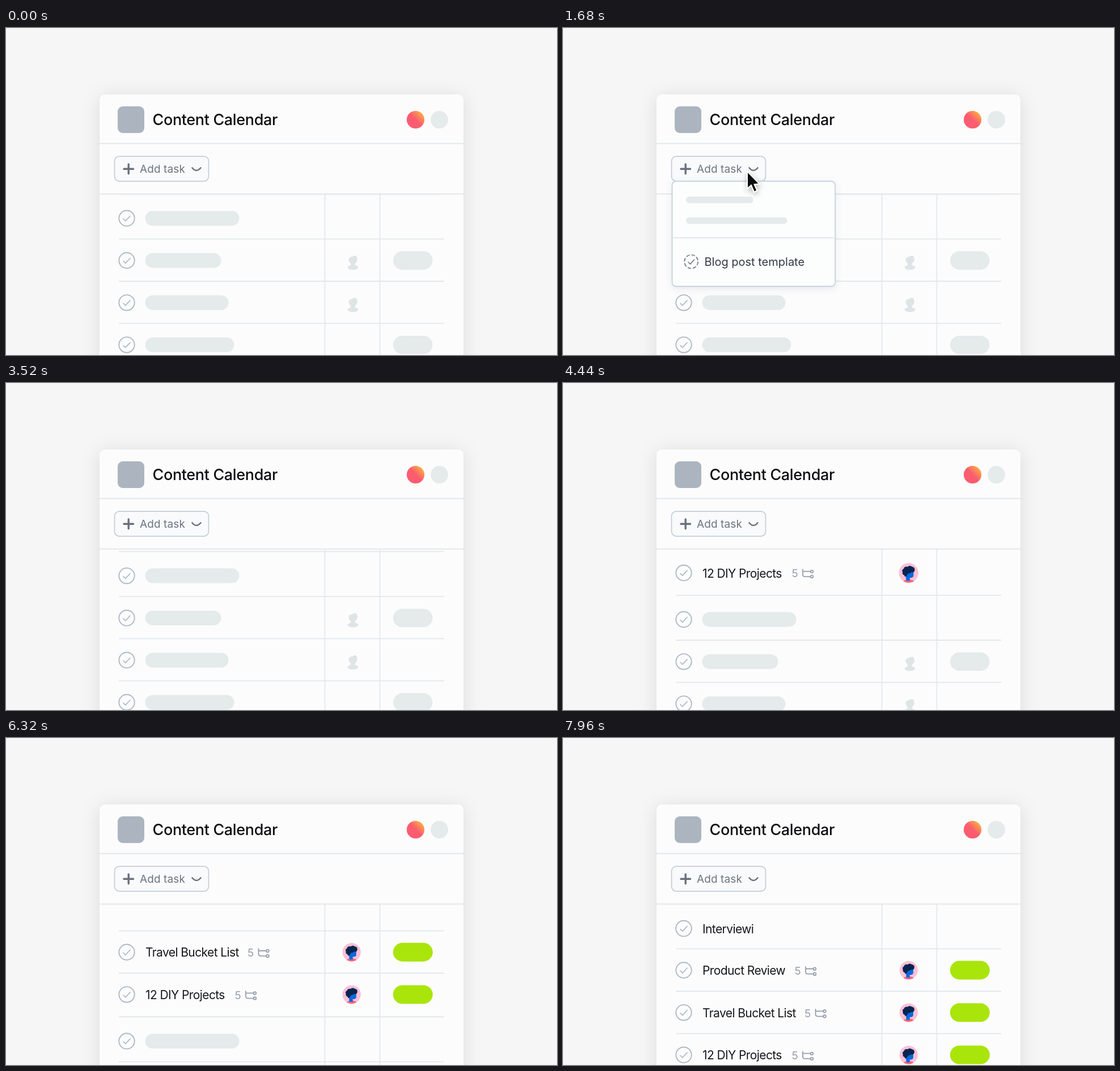
Recreate the animation shown at these times as an HTML page. Size 972 by 576 pixels, loop 8000 ms.

```html
<!DOCTYPE html>
<html lang="en">
<head>
<meta charset="utf-8">
<title>Content Calendar</title>
<style>
  html, body { margin: 0; width: 100%; height: 100%; overflow: hidden; background: #f6f6f6; }
  svg { display: block; width: 100%; height: 100%; }
  text { font-family: Inter, Roboto, "Liberation Sans", sans-serif; white-space: pre; }
  .line { stroke: #e4e8ea; stroke-width: 1.8; fill: none; }
  .soft { fill: #e5eaeb; }
  .check { stroke: #adb9c5; stroke-width: 1.9; fill: none; stroke-linecap: round; stroke-linejoin: round; }
  .title { font-size: 21px; letter-spacing: -.6px; fill: #15171a; }
  .count { font-size: 19px; fill: #959eab; }
  .branch { stroke: #959eab; stroke-width: 1.8; fill: none; stroke-linecap: round; }
</style>
</head>
<body>
<svg id="stage" viewBox="0 0 972 576">
  <defs>
    <filter id="cardShadow" x="-20%" y="-20%" width="140%" height="140%">
      <feDropShadow dx="0" dy="4" stdDeviation="16" flood-color="#000" flood-opacity=".11"/>
    </filter>
    <filter id="menuShadow" x="-20%" y="-20%" width="140%" height="150%">
      <feDropShadow dx="0" dy="4" stdDeviation="6" flood-color="#5a6a78" flood-opacity=".12"/>
    </filter>
    <filter id="cursorShadow" x="-150%" y="-100%" width="400%" height="300%">
      <feDropShadow dx="1" dy="4" stdDeviation="5" flood-color="#000" flood-opacity=".28"/>
    </filter>
    <linearGradient id="warm" x1=".3" y1=".75" x2=".95" y2=".1">
      <stop offset=".35" stop-color="#fb5c6f"/>
      <stop offset="1" stop-color="#fdba3c"/>
    </linearGradient>
    <clipPath id="listClip"><rect x="165" y="292" width="642" height="284"/></clipPath>
    <clipPath id="faceClip"><circle r="16.3"/></clipPath>
    <g id="check">
      <circle r="13.7" class="check"/>
      <path d="M-6 1.2L-2.2 4.8L6-4" class="check" style="stroke-width:1.7"/>
    </g>
    <g id="ghost" fill="#dfe5e7">
      <path d="M-7-2C-9-7-5-10-1-10C2-13 8-12 7-8C9-5 7 0 4 2L3 7H-4V2Q-6 1-7-2Z"/>
      <ellipse cy="9" rx="9.5" ry="4.2"/>
    </g>
    <g id="face" clip-path="url(#faceClip)">
      <circle r="16.3" fill="#fac1d7"/>
      <ellipse cy="16" rx="10.5" ry="5" fill="#ff6577"/>
      <path d="M-5 1L7-5Q9 1 8 6Q6 9 2 8V13H-4Z" fill="#0768de"/>
      <path d="M-7 4Q-11 3-10-1Q-12-5-8-7Q-7-11-2-10Q2-13 6-10Q11-9 10-4Q9 0 5-1L1 1Q-1 0-2 3L-4 6Q-7 7-7 4Z" fill="#08254f"/>
    </g>
    <g id="branch" class="branch">
      <path d="M0-7V2Q0 5.700 4 5.700H13.500M0-3.500H13.500"/>
      <circle cx="16" cy="-3.300" r="2.300"/>
      <circle cx="16" cy="5.700" r="2.300"/>
    </g>
  </defs>

  <rect width="972" height="576" fill="#f6f6f6"/>
  <rect x="165" y="117" width="642" height="520" rx="11" fill="#fcfcfd" filter="url(#cardShadow)"/>
  <rect x="197" y="138" width="47" height="47" rx="9" fill="#acb5bf"/>
  <text x="258.500" y="171" font-size="27" font-weight="500" letter-spacing="-.36" fill="#0d0e10">Content Calendar</text>
  <circle cx="722.500" cy="161.500" r="15.600" fill="url(#warm)"/>
  <circle cx="764.500" cy="161.500" r="15.400" class="soft"/>

  <g id="list" clip-path="url(#listClip)">
    <path class="line" d="M562.500 292V576M659.500 292V576"/>
  </g>
  <path class="line" d="M165 203.500H807M165 292.500H807"/>

  <rect x="191.500" y="226.200" width="166" height="43.600" rx="8" fill="#f8fafb" stroke="#c3ced6" stroke-width="1.700"/>
  <path d="M216.200 240V256.500M208 248.200H224.500" stroke="#69707d" stroke-width="3.400" stroke-linecap="round"/>
  <text x="236" y="255" font-size="19" letter-spacing=".1" fill="#6d7480">Add task</text>
  <path d="M328.500 246.200Q335.800 255.500 343.500 246.200" fill="none" stroke="#69707d" stroke-width="2.500" stroke-linecap="round"/>

  <g id="menu">
    <rect x="192.500" y="269.800" width="287.700" height="185.400" rx="7" fill="#fcfdfd" stroke="#c3d0da" stroke-width="1.700" filter="url(#menuShadow)"/>
    <rect x="217" y="297" width="118.500" height="11.500" rx="5.700" class="soft"/>
    <rect x="217" y="333.500" width="178.500" height="11.500" rx="5.700" class="soft"/>
    <path class="line" d="M193 369.500H480"/>
    <circle cx="226.200" cy="411.500" r="12" fill="none" stroke="#727984" stroke-width="1.700" stroke-dasharray="6.400 3.020"/>
    <path d="M221 412.500L224.500 415.800L231.500 408" fill="none" stroke="#727984" stroke-width="1.700" stroke-linecap="round"/>
    <text x="249.500" y="419" font-size="20" fill="#333b48">Blog post template</text>
  </g>

  <g id="cursor" filter="url(#cursorShadow)">
    <path d="M1 1.500V32L8 26L13 38L18.500 35.500L13.500 24.500L22.500 23.500Z" fill="#0b0b0d" stroke="#fff" stroke-width="2"/>
  </g>
</svg>
<script>
const LOOP = 8000, STEP = 74.6, FIRST_STEP = 81.3, TOP = 334.4;
const $ = id => document.getElementById(id);
const list = $("list"), menu = $("menu"), cursor = $("cursor");

const clamp = v => Math.min(1, Math.max(0, v));
const span = (t, start, length) => clamp((t - start) / length);
const cubic = u => u < .5 ? 4 * u ** 3 : 1 - 4 * (1 - u) ** 3;
const pop = u => u <= 0 ? 0 : 1 + 3.6 * (u - 1) ** 3 + 2.6 * (u - 1) ** 2;
const mix = (a, b, u) => a + (b - a) * u;

function add(parent, tag, attrs = {}) {
  const el = document.createElementNS("http://www.w3.org/2000/svg", tag);
  for (const key in attrs) el.setAttribute(key, attrs[key]);
  return parent.appendChild(el);
}
const use = (parent, id, x, y) =>
  add(parent, "use", { href: "#" + id, transform: `translate(${x} ${y})` });
const place = (el, x, y, scale = 1) =>
  el.setAttribute("transform", `translate(${x} ${y}) scale(${Math.max(0, scale)})`);

// Placeholder rows that get pushed down
const old = add(list, "g");
add(old, "path", { class: "line", d: "M199 292.5H773" });
[166, 134, 147, 157].forEach((width, i) => {
  const y = 335.2 + i * 74.3;
  use(old, "check", 213, y);
  add(old, "rect", { class: "soft", x: 245.5, y: y - 13, width, height: 26, rx: 13 });
  add(old, "path", { class: "line", d: `M199 ${y + 36.5}H773` });
  if (i === 1 || i === 2) use(old, "ghost", 612, y + 3.3);
  if (i % 2) add(old, "rect", { class: "soft", x: 683, y: y - 16.2, width: 69.5, height: 32.4, rx: 16.2 });
});

const tasks = [
  { name: "12 DIY Projects", countX: 403.5, start: 3354, slide: 700 },
  { name: "Travel Bucket List", countX: 426, start: 4782, slide: 460 },
  { name: "Product Review", countX: 408.5, start: 6079, slide: 460 },
  { name: "Interviewing", countX: 380, start: 7440, slide: 460 }
];
tasks.forEach((task, i) => {
  const row = task.row = add(list, "g");
  if (i) add(row, "path", { class: "line", d: "M199 37H773" });
  task.check = use(row, "check", 213, 0);
  task.title = add(row, "text", { class: "title", x: 246, y: 8.2 });
  task.meta = add(row, "g");
  add(task.meta, "text", { class: "count", x: task.countX, y: 8 }).textContent = "5";
  use(task.meta, "branch", task.countX + 19.5, 1);
  task.face = use(row, "face", 609.7, 0);
  task.pill = add(row, "rect", { x: -35, y: -16.4, width: 70, height: 32.8, rx: 16.4, fill: "#a9e50b" });
});

function drawTasks(t) {
  let shift = 0;
  for (let i = tasks.length - 1; i >= 0; i--) {
    const { name, start, slide, row, check, title, meta, face, pill } = tasks[i];
    const step = i ? STEP : FIRST_STEP;
    const moved = step * cubic(span(t, start, slide));
    const nudge = 1.2 * (1 - span(t, start + 800, 250));
    const typed = Math.floor((t - start - slide * .75) / 17);

    row.style.display = t < start ? "none" : "";
    place(row, 0, TOP + shift + moved - step);
    place(check, 213, nudge, pop(span(t, start + slide * .6, 260)));
    title.textContent = name.slice(0, Math.max(0, typed));
    title.setAttribute("y", 8.2 + nudge);
    meta.setAttribute("opacity", span(t, start + 720, 140));
    place(face, 609.7, 0, pop(span(t, start + 860, 280)));
    place(pill, 717.8, 0, pop(span(t, start + 1100, 350)));
    shift += moved;
  }
  place(old, 0, shift);
}

function drawPointer(t) {
  const enter = cubic(span(t, 200, 800));
  const toItem = cubic(span(t, 1720, 420));
  const press = (start) => Math.sin(Math.PI * span(t, start, 200));
  const x = mix(mix(815, 324, enter), 352, toItem);
  const y = mix(mix(308, 251, enter), 404, toItem);
  place(cursor, x, y, 1 - .14 * (press(1080) + press(2160)));
  cursor.setAttribute("opacity", span(t, 200, 140) * (1 - span(t, 2380, 180)));

  const open = span(t, 1200, 180) * (1 - span(t, 2300, 160));
  menu.setAttribute("opacity", open);
  place(menu, 0, -6 * (1 - open));
}

function frame(now) {
  const t = now % LOOP;
  drawTasks(t);
  drawPointer(t);
}

const origin = performance.now();
(function tick() {
  frame(performance.now() - origin);
  requestAnimationFrame(tick);
})();
</script>
</body>
</html>
```
